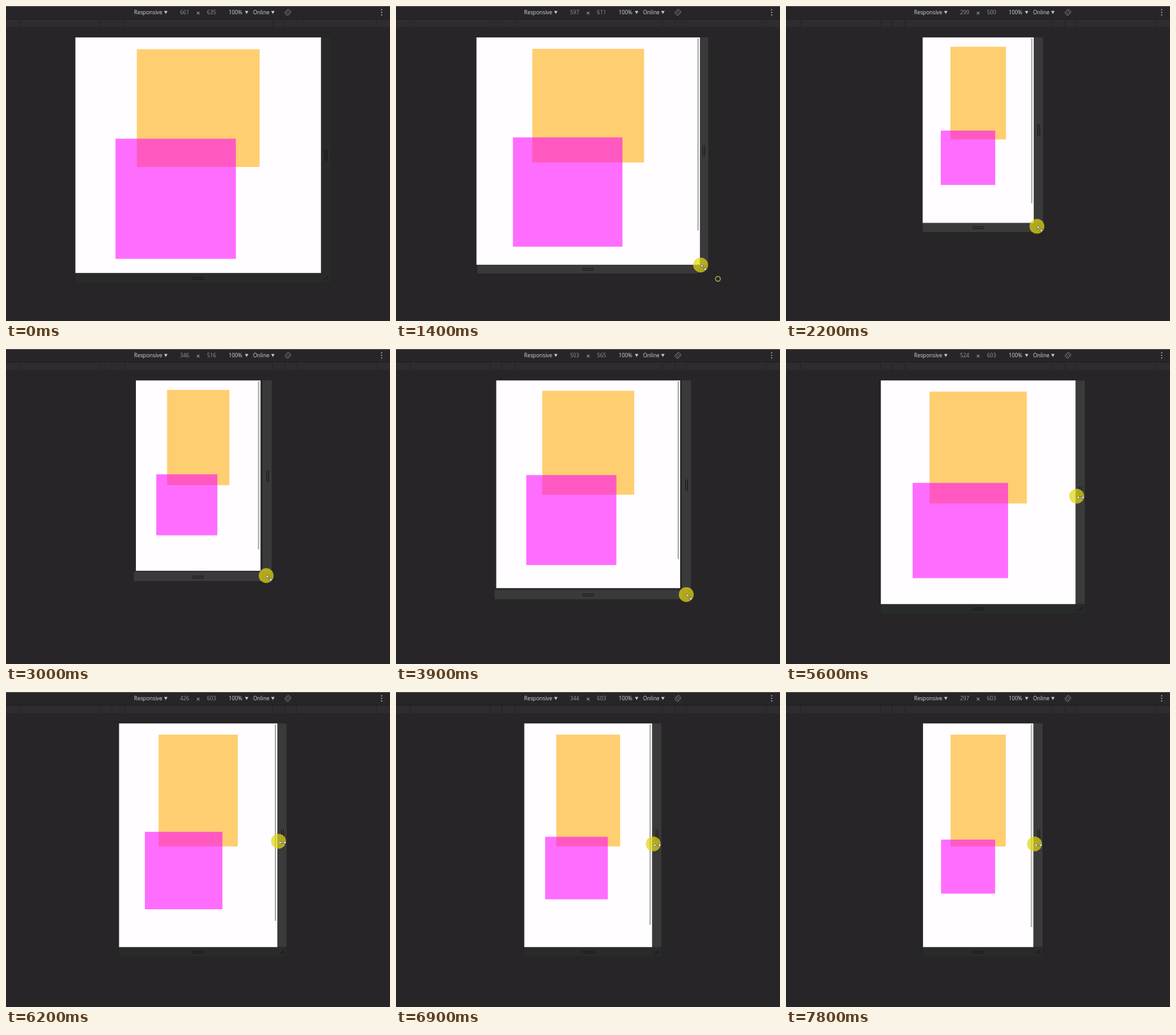
These frames come from a looping animation (600x493 px, 8 s). An HTML page with a canvas:

```html
<!DOCTYPE html>
<html lang="en">
<head>
<meta charset="utf-8">
<title>Responsive viewport resize</title>
<style>
  html, body { margin: 0; height: 100%; overflow: hidden; background: #272527; }
  canvas { display: block; }
</style>
</head>
<body>
<canvas id="stage" width="600" height="493"></canvas>
<script>
const ctx = document.getElementById('stage').getContext('2d');
const LOOP = 8000, STEP = 100;
const SCALE = 0.5805, CENTER = 300.3, TOP = 49.2, BAR = 14.5;

const clamp = u => Math.min(1, Math.max(0, u));
const mix = (a, b, u) => a + (b - a) * u;
const linear = u => u;
const smooth = u => u * u * (3 - 2 * u);
const smoother = u => u * u * u * (u * (6 * u - 15) + 10);
const late = u => u ** 1.7;

// Each drag resizes the viewport; the page repaints `lag` ms behind its frame.
const START = { w: 661, h: 635 };
const DRAGS = [
  { from: 1240, to: 2140, w: 299, h: 500, easeW: linear, easeH: linear, lag: 12 },
  { from: 2300, to: 4400, w: 524, h: 603, easeW: smoother, easeH: late, lag: 72 },
  { from: 5750, to: 6600, w: 344, h: 603, easeW: smooth, easeH: linear, lag: 0 },
  { from: 7000, to: 7800, w: 297, h: 603, easeW: smooth, easeH: linear, lag: 0 }
];

// Mouse stops, measured from the viewport's lower right corner.
const STOPS = [
  { at: 300, x: 122, y: -58 },
  { at: 1200, x: 11, y: 9.5 },
  { at: 1400, x: 2.5, y: 1.5 },
  { at: 2200, x: 5, y: 5.3 },
  { at: 4400, x: 7.5, y: 7.5 },
  { at: 5000, x: 23, y: -60 },
  { at: 5600, x: 1.8, y: -169 },
  { at: 6900, x: 1.8, y: -161.5 }
];

function viewport(t, lagging) {
  let { w, h } = START;
  for (const d of DRAGS) {
    const u = clamp((t - d.from - (lagging ? d.lag : 0)) / (d.to - d.from));
    w = mix(w, d.w, d.easeW(u));
    h = mix(h, d.h, d.easeH(u));
  }
  return { w, h };
}

function mouseOffset(t) {
  let { x, y } = STOPS[0];
  STOPS.slice(1).forEach((stop, i) => {
    const u = smooth(clamp((t - STOPS[i].at) / (stop.at - STOPS[i].at)));
    x = mix(x, stop.x, u);
    y = mix(y, stop.y, u);
  });
  return { x, y };
}

function rect(x, y, w, h, color) {
  ctx.fillStyle = color;
  ctx.fillRect(x, y, w, h);
}

function polygon(points, fill, stroke) {
  ctx.beginPath();
  points.forEach(([x, y]) => ctx.lineTo(x, y));
  ctx.closePath();
  ctx.lineWidth = 0.8;
  if (stroke) { ctx.strokeStyle = stroke; ctx.stroke(); }
  if (fill) { ctx.fillStyle = fill; ctx.fill(); }
}

function circle(x, y, r, fill, stroke) {
  ctx.beginPath();
  ctx.arc(x, y, r, 0, 2 * Math.PI);
  ctx.lineWidth = 1.5;
  if (fill) { ctx.fillStyle = fill; ctx.fill(); }
  if (stroke) { ctx.strokeStyle = stroke; ctx.stroke(); }
}

function label(text, x, color, y = 13.2, size = 8.4) {
  ctx.font = `${size}px "Open Sans", "Noto Sans", sans-serif`;
  ctx.fillStyle = color;
  ctx.fillText(text, x, y);
}

function drawMenu(text, x, arrowX) {
  label(text, x, '#d6d6d6');
  polygon([[arrowX, 7.8], [arrowX + 5.4, 7.8], [arrowX + 2.7, 12.5]], '#c8c8c8');
}

function drawRotateIcon() {
  ctx.save();
  ctx.translate(440.5, 10);
  ctx.rotate(-Math.PI / 4);
  ctx.strokeStyle = '#8f8f8f';
  ctx.lineWidth = 0.8;
  ctx.strokeRect(-1.5, -3.2, 3, 6.4);
  for (const start of [-1, 2.1]) {
    ctx.beginPath();
    ctx.arc(0, 0, 4.4, start, start + 2);
    ctx.stroke();
  }
  ctx.restore();
}

function drawToolbar({ w, h }) {
  rect(0, 0, 600, 1, '#5e5d5e');
  rect(0, 20, 600, 1, '#1e1d1e');
  rect(0, 21, 600, 12, '#2e2c2e');
  // Device-width marks mirror around the viewport's center.
  for (const d of [115.5, 135, 153, 278])
    for (const x of [CENTER - d, CENTER + d]) rect(Math.round(x), 22, 1, 11, '#232123');

  drawMenu('Responsive', 200, 247);
  drawMenu('100%', 348, 373.3);
  drawMenu('Online', 386, 414.3);
  label(Math.round(w), 272, '#999');
  label('×', 297.2, '#bbb', 15, 10.5);
  label(Math.round(h), 314, '#999');
  drawRotateIcon();
  [6, 10, 14].forEach(y => circle(587, y, 1, '#aaa'));
}

function drawFrame(right, bottom, w, h, sideLit, bottomLit) {
  const idle = '#292a2a', lit = '#3b3a3b', grip = '#151515';
  rect(right, TOP, BAR, h, sideLit ? lit : idle);
  rect(right - w, bottom, w, BAR, bottomLit ? lit : idle);
  rect(right, bottom, BAR, BAR, idle);
  for (const d of [6, 9]) {
    rect(Math.round(right + d), TOP + h / 2 - 9, 1, 18, grip);
    rect(CENTER - 9, Math.round(bottom + d), 18, 1, grip);
  }
  for (const d of [4, 8])
    polygon([[right + d, bottom + 11], [right + 11, bottom + d]], null, grip);
}

function drawPage(w, h, scrolling) {
  const left = CENTER - w / 2, side = 0.49 * w, shift = side / 3;
  rect(left, TOP, w, h, '#fffdff');
  rect(left + w / 4, TOP + h * 0.05, w / 2, h / 2, '#ffce70');
  rect(left + shift, TOP + h * 0.6 - shift, side, side, 'rgba(255,0,255,.57)');
  if (scrolling) {
    const thumb = h * h / (h + shift + 8);
    rect(left + w - 4, TOP + 1.5, 2, thumb, '#aaa8aa');
  }
}

function drawResizeCursor(x, y, angle) {
  ctx.save();
  ctx.translate(x, y);
  ctx.rotate(angle);
  rect(-4, -1, 8, 2, '#333');
  for (const s of [-1, 1])
    polygon([[s * 5.5, 0], [s * 2.8, -2.2], [s * 2.8, 2.2]], '#fff', '#333');
  rect(-3, -0.4, 6, 0.8, '#fff');
  ctx.restore();
}

function drawMouse(x, y, onCorner, onSide) {
  circle(x, y, 11.6, 'rgba(225,215,20,.73)');
  if (onCorner) drawResizeCursor(x + 4.5, y + 4, Math.PI / 4);
  else if (onSide) drawResizeCursor(x + 6.3, y + 2, 0);
  else polygon([[x, y], [x, y + 10], [x + 2.5, y + 7.8], [x + 7, y + 7]], '#fff', '#222');
}

function draw(t) {
  const size = viewport(t), page = viewport(t, true), mouse = mouseOffset(t);
  const w = size.w * SCALE, h = size.h * SCALE;
  const right = CENTER + w / 2, bottom = TOP + h;
  const onCorner = t >= 1000 && t < 4600, onSide = t >= 5400;
  const scrolling = (t >= 1300 && t < 4700) || t >= 5800;

  rect(0, 0, 600, 493, '#272527');
  drawToolbar(size);
  drawFrame(right, bottom, w, h, onCorner || onSide, onCorner);
  drawPage(page.w * SCALE, page.h * SCALE, scrolling);
  if (t >= 1200 && t <= 1400)
    circle(503, 427, mix(11, 3.8, (t - 1200) / 200), null, '#a3a83c');
  if (t >= 300) drawMouse(right + mouse.x, bottom + mouse.y, onCorner, onSide);
}

// The picture advances ten times a second.
function tick() {
  draw(Math.floor(performance.now() % LOOP / STEP) * STEP);
  requestAnimationFrame(tick);
}
tick();
</script>
</body>
</html>
```
